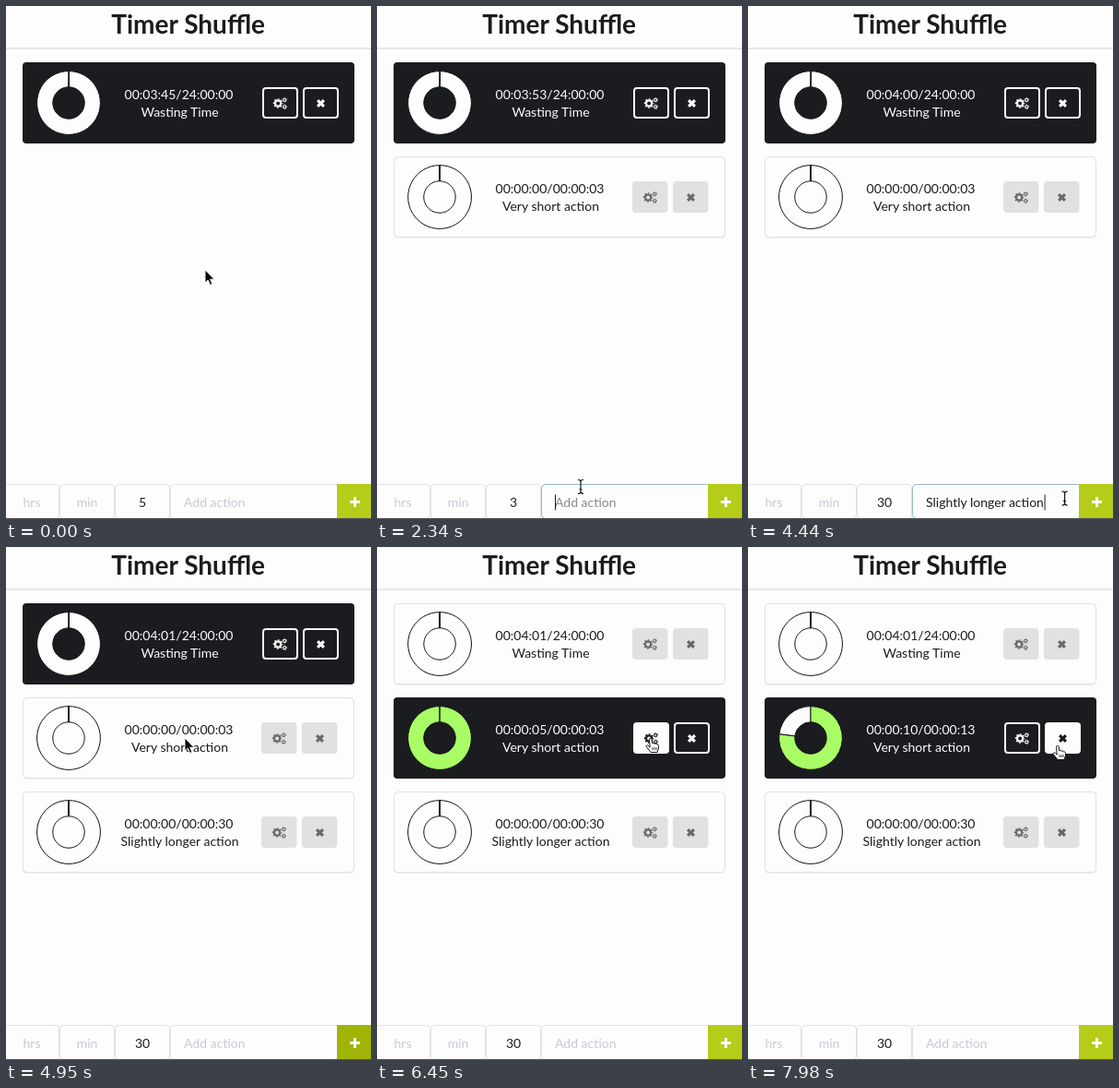
An HTML page that plays this animation: 396x556 px, repeating every 8 s.

```html
<!DOCTYPE html>
<html lang="en">
<head>
<meta charset="utf-8">
<title>Timer Shuffle</title>
<style>
html, body { margin: 0; width: 100%; height: 100%; overflow: hidden; background: #fdfdfd; }
svg { display: block; width: 396px; height: 556px; font: 14px Lato, sans-serif; }
</style>
</head>
<body>
<svg id="stage" viewBox="0 0 396 556"></svg>
<script>
const LOOP = 8000, TICK = 300, PHASE = 0.35, TWEEN = 225;
const WHITE = '#fdfdfd', DARK = '#1b1c1f', INK = '#1b1c1d', LINE = '#e0e0e8';
const GREY = '#e0e1e2', ICON = '#68696b', FAINT = '#c9c9d3', GREEN = '#a9fc66';

// Moments of the scripted session
const ADD_1 = 2130, ADD_2 = 4540, SWITCH = 4965, OPEN = 6500, SAVE = 7640;

const stage = document.getElementById('stage');
const pen = document.createElement('canvas').getContext('2d');
const clamp = v => Math.max(0, Math.min(1, v));
const ease = v => (v = clamp(v)) < 0.5 ? 4 * v ** 3 : 1 - 4 * (1 - v) ** 3;
const between = (t, a, b) => t >= a && t < b;
const pad = n => String(n).padStart(2, '0');
const clock = s => [s / 3600, s / 60 % 60, s % 60].map(n => pad(Math.floor(n))).join(':');
const widthOf = s => { pen.font = '14px Lato, sans-serif'; return pen.measureText(s).width; };
const typed = (text, t, start, step) => text.slice(0, Math.max(0, Math.floor((t - start) / step)));

const rect = (x, y, w, h, fill, extra = '') =>
  `<rect x="${x}" y="${y}" width="${w}" height="${h}" fill="${fill}" ${extra}/>`;
const label = (x, y, text, fill, anchor = 'middle', extra = '') =>
  `<text x="${x}" y="${y}" fill="${fill}" text-anchor="${anchor}" ${extra}>${text}</text>`;
const at = (x, y, body) => `<g transform="translate(${x} ${y})">${body}</g>`;
const caret = (x, y) => rect(x, y - 8.5, 1, 17, INK);

function gear(x, y, r, teeth, color) {
  const tr = r * 1.5, unit = 2 * Math.PI * tr / teeth / 2;
  return `<g fill="none" stroke="${color}">
    <circle cx="${x}" cy="${y}" r="${r}" stroke-width="${r * 0.72}"/>
    <circle cx="${x}" cy="${y}" r="${tr}" stroke-width="${r * 0.42}" stroke-dasharray="${unit}" stroke-dashoffset="${unit / 2}"/></g>`;
}
const icons = {
  cogs: c => gear(-2.4, 0, 3.1, 8, c) + gear(4.8, -3.7, 1.55, 6, c) + gear(4.8, 3.8, 1.55, 6, c),
  cross: c => `<path d="M-3.4-3.4 3.4 3.4M3.4-3.4-3.4 3.4" stroke="${c}" stroke-width="3.2"/>`,
  glass: c => `<path d="M-5.5-6.5H5.5M-5.5 6.5H5.5M-4-6C-4-2-1-1.5-1 0S-4 2-4 6M4-6C4-2 1-1.5 1 0S4 2 4 6" fill="none" stroke="${c}" stroke-width="1.4"/><path d="M-3 5.5Q-2 3 0 2.4 2 3 3 5.5ZM-2.6-3H2.6L0 0Z" fill="${c}"/>`
};

function button(x, y, icon, active, hover) {
  const box = !active ? rect(x - 1, y, 38.5, 34, GREY, 'rx="4"')
    : hover ? rect(x, y, 39, 34, WHITE, 'rx="4"')
    : rect(x + 1, y + 1, 37, 32, 'none', `rx="3" stroke="${WHITE}" stroke-width="2"`);
  const color = !active ? ICON : hover ? DARK : WHITE;
  return box + at(x + (active ? 19.5 : 18.5), y + 17.5, icons[icon](color));
}

function wedge(from, to, fill) {
  const R = 34.4, r = 17.2;
  const end = Math.min(to, from + 0.9999);
  const p = (rad, f) => {
    const a = f * 2 * Math.PI;
    return `${(rad * Math.sin(a)).toFixed(3)} ${(-rad * Math.cos(a)).toFixed(3)}`;
  };
  const big = end - from > 0.5 ? 1 : 0;
  return `<path d="M${p(R, from)}A${R} ${R} 0 ${big} 1 ${p(R, end)}L${p(r, end)}A${r} ${r} 0 ${big} 0 ${p(r, from)}Z" fill="${fill}" stroke="#101012"/>`;
}

function ring(part, grown) {
  const p = clamp(part);
  return (p < 1 && grown > p ? wedge(p, grown, WHITE) : '') + wedge(0, Math.min(p, grown), GREEN);
}

function card(y, c, mouse) {
  const over = x => mouse.x >= x && mouse.x <= x + 39 && mouse.y >= y + 27 && mouse.y <= y + 61;
  const ink = c.active ? WHITE : INK;
  let out = c.active ? rect(18, y, 360, 88, DARK, 'rx="4"')
    : rect(18.5, y + 1.5, 359, 87, '#e4e4e8', 'rx="4"') +
      rect(18.5, y + 0.5, 359, 87, WHITE, `rx="4" stroke="${LINE}"`);
  if (c.edit) {
    c.edit.forEach((v, i) => {
      const x = 38 + 96 * i;
      out += rect(x, y + 26, 83, 36, WHITE, 'rx="4"') + label(x + 41.5, y + 50, v, INK);
    });
    if (c.caret) out += caret(271.5 + widthOf(c.edit[2]) / 2, y + 45);
    return out + button(322, y + 27, 'glass', true, over(322));
  }
  return out + at(68, y + 44, ring(c.part, c.grown)) +
    label(187.5, y + 40, `${clock(c.count)}/${clock(c.total)}`, ink) +
    label(188.5, y + 59, c.name, ink) +
    button(278, y + 27, 'cogs', c.active, over(278)) +
    button(322, y + 27, 'cross', c.active, over(322));
}

// Pointer stops: time, x, y
const path = [
  [0, 216, 286], [230, 216, 286], [560, 150, 538], [840, 150, 538], [1000, 221, 521],
  [2360, 221, 521], [2620, 150, 538], [3000, 150, 538], [3200, 221, 521], [4360, 221, 521],
  [4490, 377, 537], [4600, 377, 537], [4880, 194, 207], [5900, 194, 207], [6350, 297, 208],
  [6620, 297, 208], [6900, 285, 214], [7380, 285, 214], [7580, 341, 207], [7680, 341, 207],
  [7820, 336, 216], [LOOP, 336, 216]
];
function pointer(t) {
  const i = Math.max(1, path.findIndex(k => k[0] > t));
  const [t0, x0, y0] = path[i - 1], [t1, x1, y1] = path[i];
  const e = ease((t - t0) / (t1 - t0));
  return { x: x0 + (x1 - x0) * e, y: y0 + (y1 - y0) * e };
}

function cursor(t, m) {
  if (between(t, 1090, 2200) || between(t, 3340, 4360) || between(t, 7200, 7380)) return '';
  const editing = between(t, OPEN, SAVE);
  const inButton = m.y > 190 && m.y < 224 && (between(m.x, 322, 361) || !editing && t > SWITCH && between(m.x, 278, 316));
  const inField = m.y > 518 && m.x < 359 || editing && m.y > 189 && m.y < 225 && between(m.x, 230, 313);
  if (inField) return at(m.x, m.y,
    `<path d="M-3-7.5Q0-7.5 0-5.5 0-7.5 3-7.5M0-5.5V5.5M-3 7.5Q0 7.5 0 5.5 0 7.5 3 7.5M-1.5 3H1.5" fill="none" stroke="#111" stroke-width="1.2"/>`);
  if (inButton || m.y > 518) return at(m.x, m.y,
    `<path d="M-1.5.5C-1.5-1 1-1 1.2.5L1.8 5C2.5 4 4 4.3 4.2 5.4 5 4.6 6.3 5 6.5 6.1 7.6 5.6 8.5 6.3 8.5 7.5V10L7 14.5H0L-4.7 8.7C-5.5 7.3-3.9 6.2-2.7 7.2L-.8 9Z" fill="#fff" stroke="#111"/><path d="M2 9v3M4 9v3M6 9v3" stroke="#111" stroke-width=".8"/>`);
  return at(m.x, m.y,
    `<path d="M0 0V14L3.2 11.1 5.5 16.4 7.9 15.4 5.7 10.2H10Z" fill="#080808" stroke="#fff" stroke-width=".9"/>`);
}

function form(t) {
  const secs = t < 720 ? '5' : t < 2960 ? '3' : '30';
  const first = t < ADD_1 ? typed('Very short action', t, 1040, 60) : '';
  const second = between(t, ADD_1, ADD_2) ? typed('Slightly longer action', t, 3310, 45) : '';
  const text = first || second;
  const onSecs = between(t, 620, 1010) || between(t, 2660, 3220);
  const onText = between(t, 1010, 2660) || between(t, 3220, ADD_2);
  const box = (x, w, on) => rect(x + 0.5, 518.5, w - 1, 37, WHITE, `rx="4" stroke="${on ? '#98b8cc' : LINE}"`);
  let out = box(-2, 60) + box(58, 60) + box(118, 60, onSecs) +
    label(28, 543, 'hrs', FAINT) + label(88, 543, 'min', FAINT) + label(148, 543, secs, INK) +
    box(178, 184, onText) +
    label(193, 543, text || 'Add action', text ? INK : onText ? '#88888c' : FAINT, 'start');
  if (onSecs) out += caret(148 + widthOf(secs) / 2, 538);
  if (onText) out += caret(193 + widthOf(text), 538);
  const plus = between(t, 4470, SWITCH) ? '#a0b408' : '#b5cc18';
  return out + rect(359, 518, 37, 38, plus) +
    `<path d="M373 537.5H384M378.5 532V543" stroke="${WHITE}" stroke-width="3"/>`;
}

function draw(t) {
  const beat = t / TICK + PHASE;
  const count1 = 225 + Math.floor(Math.min(t, SWITCH) / TICK + PHASE);
  const count2 = t < SWITCH ? 0 : Math.floor(beat) - 16;
  const smooth2 = count2 > 0 ? count2 - 1 + ease(beat % 1 * TICK / TWEEN) : 0;
  const total2 = t < SAVE ? 3 : 13;
  const grown = born => Math.max(0.0001, ease((t - born) / TWEEN));
  const mouse = pointer(t);
  const day = 86400;

  const cards = [{ name: 'Wasting Time', count: count1, total: day, part: t < SWITCH ? count1 / day : 0.0005, grown: 1, active: t < SWITCH }];
  if (t >= ADD_1) cards.push({
    name: 'Very short action', count: count2, total: total2, part: smooth2 / total2,
    grown: grown(ADD_1), active: t >= SWITCH,
    edit: between(t, OPEN, SAVE) && ['0', '0', t < 7220 ? '3' : t < 7300 ? '1' : '13'],
    caret: t >= 7100
  });
  if (t >= ADD_2) cards.push({ name: 'Slightly longer action', count: 0, total: 30, part: 0, grown: grown(ADD_2) });

  stage.innerHTML = rect(0, 0, 396, 556, WHITE) +
    label(197.7, 30, 'Timer Shuffle', INK, 'middle', 'font-size="28" font-weight="700"') +
    rect(0, 45, 396, 2, '#e6e6ea') +
    cards.map((c, i) => card(61 + 102 * i, c, mouse)).join('') +
    form(t) + rect(0, 555, 396, 1, '#55565a') + cursor(t, mouse);
}

const begin = performance.now();
function frame() {
  draw((performance.now() - begin) % LOOP);
  requestAnimationFrame(frame);
}
draw(0);
requestAnimationFrame(frame);
</script>
</body>
</html>
```
